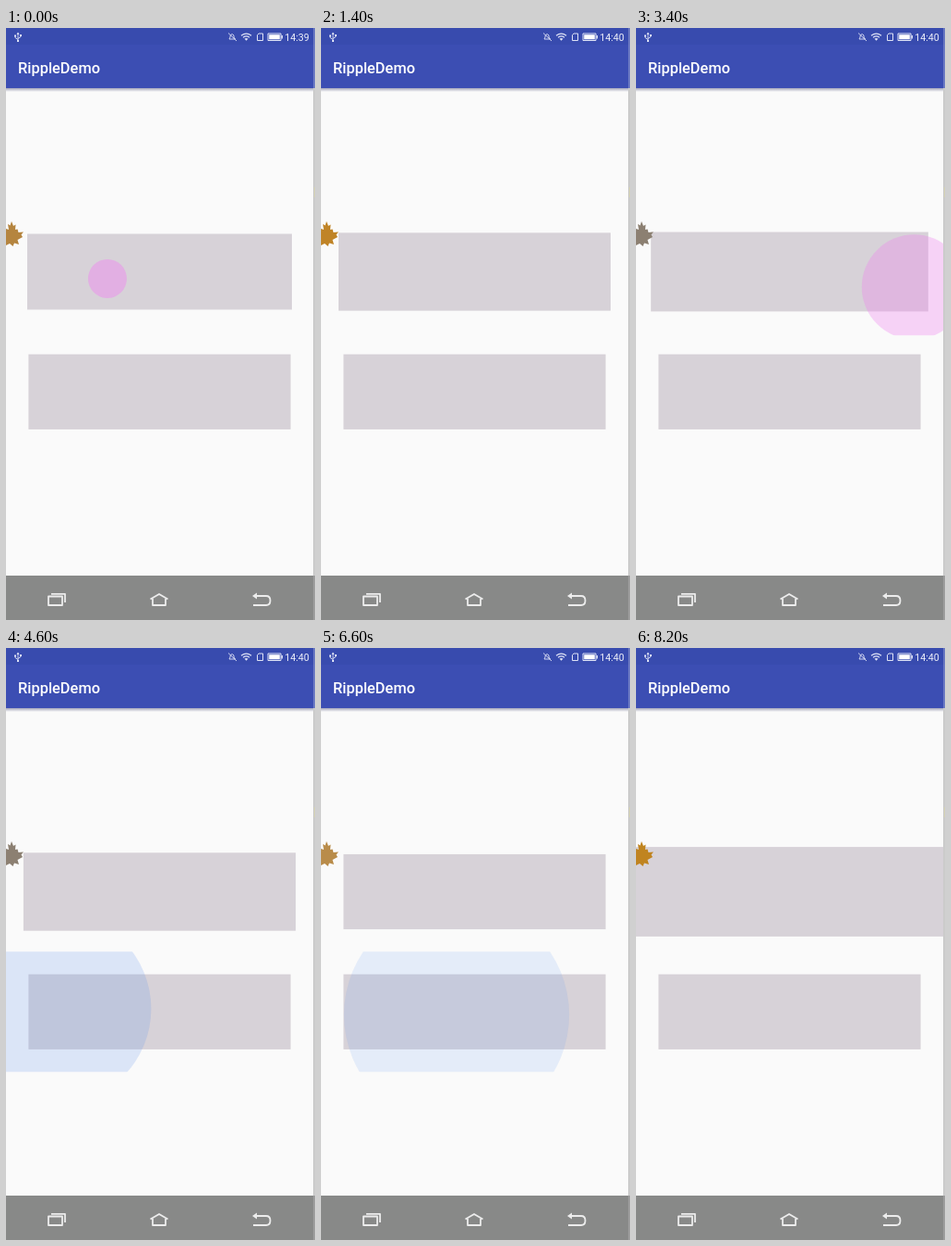
These frames come from a looping animation (335x640 px, 8.4 s). An HTML page with a canvas:

```html
<!DOCTYPE html>
<html lang="en">
<head>
<meta charset="utf-8">
<title>RippleDemo</title>
<style>
  html, body { margin: 0; width: 100%; height: 100%; overflow: hidden; background: #fafafa; }
  canvas { display: block; width: 335px; height: 640px; }
</style>
</head>
<body>
<canvas id="stage" width="335" height="640"></canvas>
<script>
const ctx = document.getElementById('stage').getContext('2d');
const LOOP = 8400, STEP = 200, WIDTH = 333, MAX_RADIUS = WIDTH / 2;
const ZOOM_TIME = 890, ZOOM = 0.2;

// Pauses during which the picture stands still: [from, to].
const pauses = [[5200, 5800], [6200, 6600], [7000, 7600]];

const top_ = {
  centerY: 263.5, color: '#ee82ee', alpha: 0.5, duration: 1000, zooms: true,
  taps: [[-125, 110.5, 270.9], [3078, 294.1, 279.1], [7200, 160, 265]]
};
const bottom = {
  centerY: 393.3, color: '#6495ed', alpha: 0.55, duration: 480, zooms: false,
  taps: [[4302, 54, 390], [4912, 227, 407], [6248, 147, 396.5]]
};

const leafTones = [
  [0, 181, 133, 63], [1400, 192, 132, 39], [3400, 140, 128, 114], [4600, 140, 128, 114],
  [5200, 176, 148, 104], [6600, 185, 140, 74], [8200, 192, 132, 32]
];

function rect(x, y, w, h, color) {
  ctx.fillStyle = color;
  ctx.fillRect(x, y, w, h);
}

function shape(d, color, lineWidth) {
  const path = new Path2D(d);
  if (lineWidth) {
    ctx.strokeStyle = color;
    ctx.lineWidth = lineWidth;
    ctx.stroke(path);
  } else {
    ctx.fillStyle = color;
    ctx.fill(path);
  }
}

function text(value, x, y, font, color) {
  ctx.font = font + ' Roboto, sans-serif';
  ctx.fillStyle = color;
  ctx.fillText(value, x, y);
}

function zoomAt(view, t) {
  if (!view.zooms) return 1;
  for (const [start] of view.taps) {
    const x = (t - start) / ZOOM_TIME;
    if (x >= 0 && x <= 2) return 1 + ZOOM * (1 - Math.cos(Math.PI * x)) / 2;
  }
  return 1;
}

function drawView(view, t) {
  const zoom = zoomAt(view, t);
  ctx.save();
  ctx.translate(WIDTH / 2, view.centerY);
  ctx.scale(zoom, zoom);
  ctx.translate(-WIDTH / 2, -view.centerY);
  rect(24.4, view.centerY - 40.6, 284.2, 81.2, '#d7d2d8');
  ctx.beginPath();
  ctx.rect(0, view.centerY - 65, WIDTH, 130);
  ctx.clip();
  for (const [start, x, y] of view.taps) {
    const p = (t - start) / view.duration;
    if (p < 0 || p >= 1) continue;
    ctx.globalAlpha = view.alpha * (1 - p);
    ctx.fillStyle = view.color;
    ctx.beginPath();
    ctx.arc(x, y, MAX_RADIUS * p, 0, Math.PI * 2);
    ctx.fill();
  }
  ctx.restore();
}

function leafColor(t) {
  let i = leafTones.length - 1;
  while (leafTones[i][0] > t) i--;
  const a = leafTones[i], b = leafTones[i + 1] || a;
  const k = b === a ? 0 : (t - a[0]) / (b[0] - a[0]);
  const mix = [1, 2, 3].map(c => Math.round(a[c] + (b[c] - a[c]) * k));
  return `rgb(${mix})`;
}

function drawLeaf(t) {
  shape('M6 209L8 214 10.5 212.5 10 218 12.5 217.5 13.5 221 19 220.5 16.5 223.5 18 226 ' +
    '12.5 229 14 234 9 232.5 7.5 236 4 233 0 235V217L3 218 2 212 4.5 213.5Z', leafColor(t));
}

function drawBars(t) {
  rect(0, 0, 335, 65, '#3c4eb3');
  rect(0, 0, 335, 18, '#384bae');
  const shadow = ctx.createLinearGradient(0, 65, 0, 69);
  shadow.addColorStop(0, 'rgba(60,65,110,.45)');
  shadow.addColorStop(1, 'rgba(60,65,110,0)');
  rect(0, 65, 335, 4, shadow);
  text('RippleDemo', 13, 48.5, '500 16.4px', '#fff');
  text(t < 800 ? '14:39' : '14:40', 302.3, 13.5, '10.6px', '#eef0fa');

  const tint = '#dfe3f6';
  // usb
  shape('M13 5.5V14M10 8.5V10.5L13 12.5M16 7.8V9.5L13 11.5', tint, 0.9);
  shape('M13 4.5L14.5 7H11.5ZM9 7.5H11V9.5H9ZM15 7H17V9H15ZM12 13H14V15H12Z', tint);
  // muted bell
  shape('M242 12H248.5L247 10V8Q246 6 244 7Q243 8 243 10ZM241 5.5L250 14', tint, 0.9);
  // wifi
  shape('M255 8.3Q260.5 4 266 8.3M257 10.3Q260.5 7.6 264 10.3', tint, 1.2);
  shape('M258.5 11.5Q260.5 10.3 262.5 11.5L260.5 13.7Z', tint);
  // card
  shape('M274 6H278.5V13.5H272.5V7.5Z', tint, 1);
  // battery
  shape('M284 6H298V13.5H284Z', tint, 1);
  rect(285.2, 7.2, 11.6, 5.1, '#fff');
  rect(298.5, 8, 1.5, 3.5, tint);
}

function drawNavigation() {
  rect(0, 592, 335, 48, '#888988');
  ctx.lineJoin = 'round';
  const tint = '#ececec';
  shape('M46 614.5H61V624H46ZM49 611.8H64V621', tint, 1.8);
  shape('M156.5 617.5L166 612 175.5 617.5M159 617V624H173V617', tint, 1.8);
  shape('M269 614H282Q286.5 614 286.5 619T282 624H268', tint, 1.8);
  shape('M267 614L272 610.5V617.5Z', tint);
}

function draw(t) {
  rect(0, 0, 335, 640, '#fafafa');
  drawView(top_, t);
  drawView(bottom, t);
  drawLeaf(t);
  drawBars(t);
  drawNavigation();
  rect(333, 65, 2, 527, '#cbcbcb');
  rect(334, 172, 1, 11, '#d6d2b4');
  rect(333, 0, 2, 65, 'rgba(190,195,220,.35)');
  rect(333, 592, 2, 48, 'rgba(190,190,190,.35)');
}

function frame() {
  let t = Math.floor(performance.now() % LOOP / STEP) * STEP;
  for (const [from, to] of pauses) if (t >= from && t < to) t = from;
  draw(t);
  requestAnimationFrame(frame);
}
frame();
</script>
</body>
</html>
```
